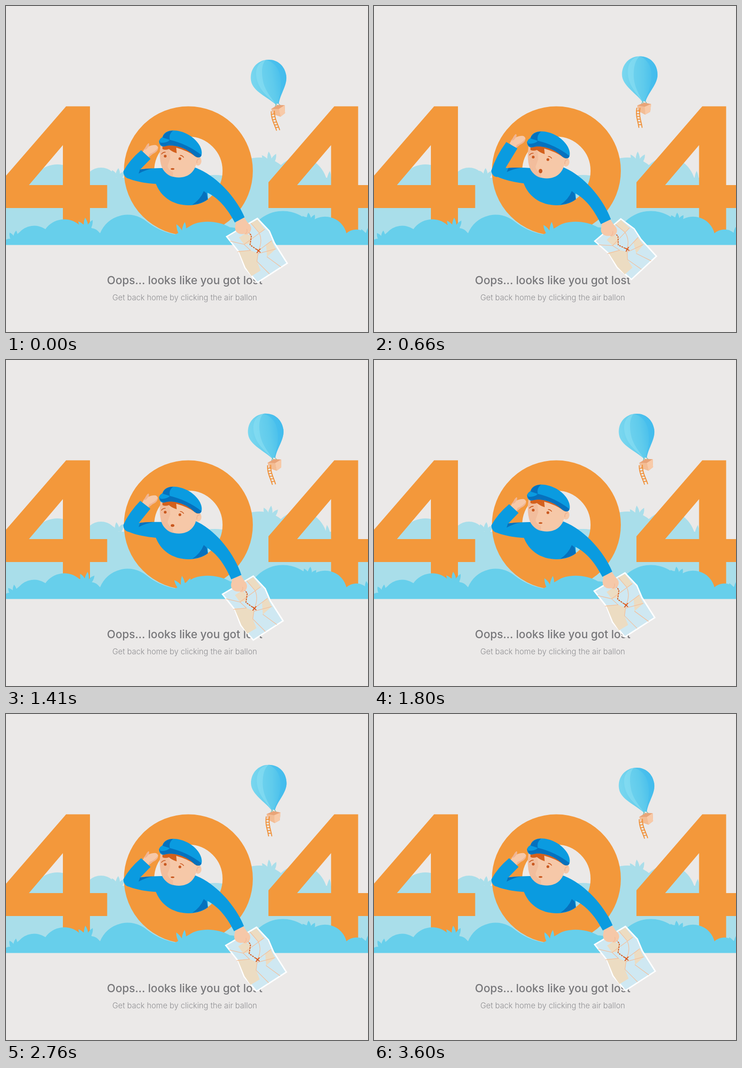
These frames come from a looping animation (789 by 710 pixels, 3630 ms). An HTML page:

```html
<!DOCTYPE html>
<html lang="en">
<head>
<meta charset="utf-8">
<title>404</title>
<style>
  html, body { margin: 0; width: 100%; height: 100%; overflow: hidden; background: #ebe9e8; }
  svg { position: absolute; left: 0; top: 0; width: 789px; height: 710px; }
  text { font-family: Inter, "Open Sans", sans-serif; text-anchor: middle; }
  .orange { fill: #f3983b; }
  .back { fill: #a9deea; }
  .front { fill: #67cfeb; }
  .blue { fill: #0a9be0; }
  .navy { fill: #0671bd; }
  .skin { fill: #f6c8a8; }
  .shade { fill: #f0b492; }
  .line { fill: none; stroke-linecap: round; stroke-linejoin: round; }
</style>
</head>
<body>
<svg viewBox="0 0 789 710">
  <defs>
    <linearGradient id="air">
      <stop offset="0" stop-color="#7ad7ef"/>
      <stop offset=".6" stop-color="#5fcbec"/>
      <stop offset="1" stop-color="#3fbaec"/>
    </linearGradient>
    <path id="four" fill-rule="evenodd"
      d="M131,218.500H183V390H220.500V440H183V515H124V440H-12.500V384ZM124,303L50,390H124Z"/>
  </defs>
  <rect width="789" height="710" fill="#ebe9e8"/>

  <g class="back">
    <path d="M0,374H767V440H789V520H0Z"/>
    <ellipse cx="112" cy="395" rx="55" ry="50"/>
    <ellipse cx="207" cy="382" rx="34" ry="30"/>
    <ellipse cx="455" cy="385" rx="42" ry="17"/>
    <ellipse cx="552" cy="385" rx="66" ry="55"/>
    <ellipse cx="640" cy="400" rx="62" ry="71"/>
    <g class="tufts-back"></g>
  </g>

  <g class="orange">
    <use href="#four"/>
    <use href="#four" x="584.500"/>
  </g>
  <circle cx="397.500" cy="359" r="107.500" fill="none" stroke="#f3983b" stroke-width="66"/>

  <g class="front">
    <path d="M0,520.500V509Q8,505 12,508Q20,500 28,494A44 44 0 0 1 86,486A50 50 0 0 1 160,477
      Q180,472 187,484Q196,484 205,495A65 65 0 0 1 306,469A142 142 0 0 0 369,497.500L376,494L400,480
      C420,466 460,466 488,482Q510,484 520,486L545,472A80 80 0 0 1 648,460Q660,458 670,466
      A48 48 0 0 1 742,495A32 32 0 0 1 784,494L789,492V520.500Z"/>
    <g class="tufts-front"></g>
  </g>

  <text x="389.500" y="606" font-size="24.200" font-weight="500" fill="#77777a">Oops... looks like you got lost</text>
  <text x="389.500" y="641" font-size="17" font-weight="300" fill="#8f8f92">Get back home by clicking the air ballon</text>

  <g class="balloon">
    <path d="M8,57L3,67M5,57L9,64M11,57L17,66" stroke="#4fae9c" fill="none"/>
    <path fill="url(#air)" d="M0,-39C23,-39 39,-22 39,1C39,22 20,38 13,59H5C-8,42 -38.500,24 -38.500,1
      C-38.500,-22 -22,-39 0,-39Z"/>
    <path fill="#8bdff3" opacity=".6" d="M0,-39C-21,-36 -28,-17 -25,4C-22,27 -5,44 6,59
      C-2,42 -13,25 -13,2C-13,-18 -9,-31 0,-39Z"/>
    <path fill="#44bdee" opacity=".65" d="M0,-39C19,-32 26,-14 26,3C26,26 17,42 11,59H13
      C20,38 39,22 39,1C39,-22 23,-39 0,-39Z"/>
    <path fill="#e9a478" d="M-5,68L10,62L25,65L23,82L12,88L-3,80Z"/>
    <path fill="#f3bd95" d="M-5,68L11,71L12,88L-3,80Z"/>
    <path fill="#f8caa8" d="M11,71L25,65L23,82L12,88Z"/>
    <path class="rails line" stroke="#f08f35" stroke-width="2"/>
  </g>

  <g class="reach">
    <g class="map">
      <path fill="#cfe8f2" stroke="#fff" stroke-width="3"
        d="M479,504L546,464.500L572,492L583,518L611,562L546,604L519,572L506,538Z"/>
      <path fill="#ecdcc2" d="M532,475L546,467L562,488L550,496ZM506,506L520,497L533,503L532,519L517,521Z
        M565,522L577,513L586,531L567,548ZM505,535L531,534L548,541L545,558L553,578L533,590L520,571Z"/>
      <path class="line" stroke="#f3bf9b" stroke-width="1.300"
        d="M487,514L517,521L562,488M517,521L531,534L503,537M532,475L550,496Q558,514 548,535L545,558L572,585
        M548,541L586,531M567,548L597,570M577,513L565,522L548,535"/>
      <path class="line" stroke="#d9662a" stroke-width="2.300" stroke-dasharray="2 3.600"
        d="M523,490L533,502L530,522L547,534"/>
      <path class="line" stroke="#d9561a" stroke-width="2" d="M545,532L552,538M552,531L545,539"/>
    </g>
    <path class="skin" d="M500,468L517,461Q523,472 530,479Q535,487 530,494Q524,502 517,498
      Q506,500 500,493Q496,488 498,480Z"/>
    <path class="line" stroke="#f0b492" d="M519,498Q525,495 523,488"/>
    <path class="blue" d="M408,350C455,366 500,416 518.500,462L497,473C480,440 460,415 430,403L400,390Z"/>
  </g>

  <path class="blue" d="M323,375C332,415 364,434 398,434C418,434 433,427 440,421L438,385L416,353L343,353Z"/>
  <path class="navy" d="M406,433Q424,421 431,403L437,408L440,421Q428,430 406,433Z"/>

  <g class="hand">
    <path class="skin" d="M297,319L304,308Q308,300 311,299Q313,301 311,306Q320,302 327,303Q333,306 331,312
      Q329,318 320,322L309,331Z"/>
    <path class="shade" d="M299,314L304,308Q308,300 311,299Q313,301 311,306L306,312ZM309,331L313,322
      Q325,318 331,309Q331,317 320,322Z"/>
  </g>
  <g class="arm">
    <path class="forearm blue" d="M54,-14V14L14,13Q-4,18 -11,6Q-14,-4 -6,-11Q22,-18 54,-14Z"/>
    <path class="blue" d="M258,366Q262,358 292,356C304,354 322,353 346,353L345,388C318,388 282,384 261,373Z"/>
    <path class="navy" d="M292,356Q305,354 320,354Q303,357 289,365Z"/>
  </g>

  <g class="head">
    <ellipse class="skin" cx="418.500" cy="337" rx="7.500" ry="10"/>
    <path class="line" stroke="#f0b492" stroke-width="2" d="M416,341Q415,333 422,332"/>
    <path class="skin" d="M337,300C334,322 335,343 342,355C350,368 364,373 377,373C399,373 414,358 415,338L420,322L380,298Z"/>
    <path class="shade" opacity=".5" d="M337,300C334,322 335,343 342,355C348,365 356,370 364,372L364,361
      Q354,357 352,348L358,331Q358,315 352,303Z"/>
    <path fill="#d4601c" d="M341,302L372,300L424,326Q418,333 411,326Q396,315 371,308L372,320
      Q362,317 355,311Q347,314 341,311Z"/>
    <path class="blue" d="M341,285C346,267 373,267 396,279C418,291 430,311 426,325Q423,333 411,326
      C396,310 366,299 346,305C338,308 333,300 333.500,293Q336,288 341,285Z"/>
    <path class="navy" d="M341,286Q345,272 364,271Q354,279 357,291Q395,300 426,324Q423,333 411,326
      C396,310 366,299 346,305Q336,306 334,294Q347,296 357,291Z"/>
    <path class="blue" d="M341,285Q346,293 357,292Q347,299 336,297Q334,293 336,289Z"/>
    <g fill="#c9581f">
      <circle cx="347" cy="326.500" r="3"/>
      <circle cx="379" cy="332" r="3"/>
      <ellipse class="mouth" cx="363" rx="4"/>
    </g>
    <path class="line" stroke="#c9581f" stroke-width="1.700" d="M339,322Q342,318 347,318M380,325Q384,325 387,329"/>
  </g>
</svg>

<script>
const LOOP = 3630;
const roots = {
  back: [[243, 374], [575, 342], [703, 388]],
  front: [[20, 510], [175, 486], [387, 499], [661, 471], [788, 506]]
};

const wave = (t, period, peak) => Math.cos(2 * Math.PI * (t - peak) / period);
const mix = (a, b, k) => a + (b - a) * k;

function ease(t, from, to) {
  const k = Math.min(1, Math.max(0, (t - from) / (to - from)));
  return k * k * (3 - 2 * k);
}

// Rises at the start of the loop, then settles until `end`
const pulse = (t, end) => ease(t, 0, 400) - ease(t, 900, end);

// Three pointed leaves fanned out from a shared root
function tuft([x, y], i) {
  return [-1, 0, 1].map(side => {
    const size = 21 + 4 * (i % 3) - 3 * Math.abs(side);
    return `<path d="M-4.5,0Q-6,${-size * .6} 0,${-size}Q6,${-size * .6} 4.5,0Z"
      transform="translate(${x + 4 * side} ${y}) rotate(${32 * side})"/>`;
  }).join('');
}

function ladder() {
  const rail = y => -2 + 3 * Math.sin((y - 104) / 13);
  let left = '', right = '', rungs = '';
  for (let y = 74; y <= 116; y += 6) {
    const x = rail(y);
    left += `${left ? 'L' : 'M'}${x - 2},${y}`;
    right += `${right ? 'L' : 'M'}${x + 5},${y}`;
    if (y > 74 && y < 116) rungs += `M${x - 2},${y}h7`;
  }
  return left + right + rungs;
}

const scene = document.querySelector('svg');
scene.querySelector('.rails').setAttribute('d', ladder());
for (const layer in roots) {
  scene.querySelector('.tufts-' + layer).innerHTML =
    roots[layer].map((root, i) => `<g>${tuft(root, i)}</g>`).join('');
}

function pose(root, t) {
  const set = (name, attr, value) => root.querySelector('.' + name).setAttribute(attr, value);
  const move = (name, value) => set(name, 'transform', value);

  for (const layer in roots) {
    const leaves = root.querySelector('.tufts-' + layer).children;
    roots[layer].forEach(([x, y], i) =>
      leaves[i].setAttribute('transform', `rotate(${7 * wave(t, 1000, 900 - 500 * (i % 2))} ${x} ${y})`));
  }

  const x = 573 + 7.2 * wave(t, 1800, 490);
  const y = 152.6 + 4.3 * wave(t, 1800, -180);
  move('balloon', `translate(${x} ${y}) rotate(${-4.8 - 5.2 * wave(t, 1800, -130)})`);

  const reach = 1.2 + 2.5 * wave(t, 1000, 430);
  const turn = pulse(t, 1400);
  move('reach', `rotate(${reach} 420 380)`);
  move('map', `translate(518 487) rotate(${-10 * turn - reach}) scale(${1 - .04 * turn}) translate(-518 -487)`);

  const up = pulse(t, 1800);
  move('hand', `translate(${-1.5 * up} ${-20 * up})`);
  move('arm', `rotate(${3.5 * up} 345 370)`);
  move('forearm', `translate(268 363) rotate(${-47 - 16.5 * up}) scale(${1 + .18 * up} 1)`);

  move('head', `translate(0 ${2.5 + 2.5 * wave(t, 1000, 410)})`);
  set('mouth', 'cy', mix(354.5, 357, up));
  set('mouth', 'ry', mix(1.8, 4.8, up));
}

// The opening pose fades in over the end of the loop
const opening = scene.cloneNode(true);
opening.setAttribute('aria-hidden', 'true');
document.body.append(opening);
pose(opening, 0);

function draw() {
  const t = performance.now() % LOOP;
  pose(scene, t);
  opening.style.opacity = Math.min(1, Math.max(0, (t - 3240) / 360));
  requestAnimationFrame(draw);
}
draw();
</script>
</body>
</html>
```
